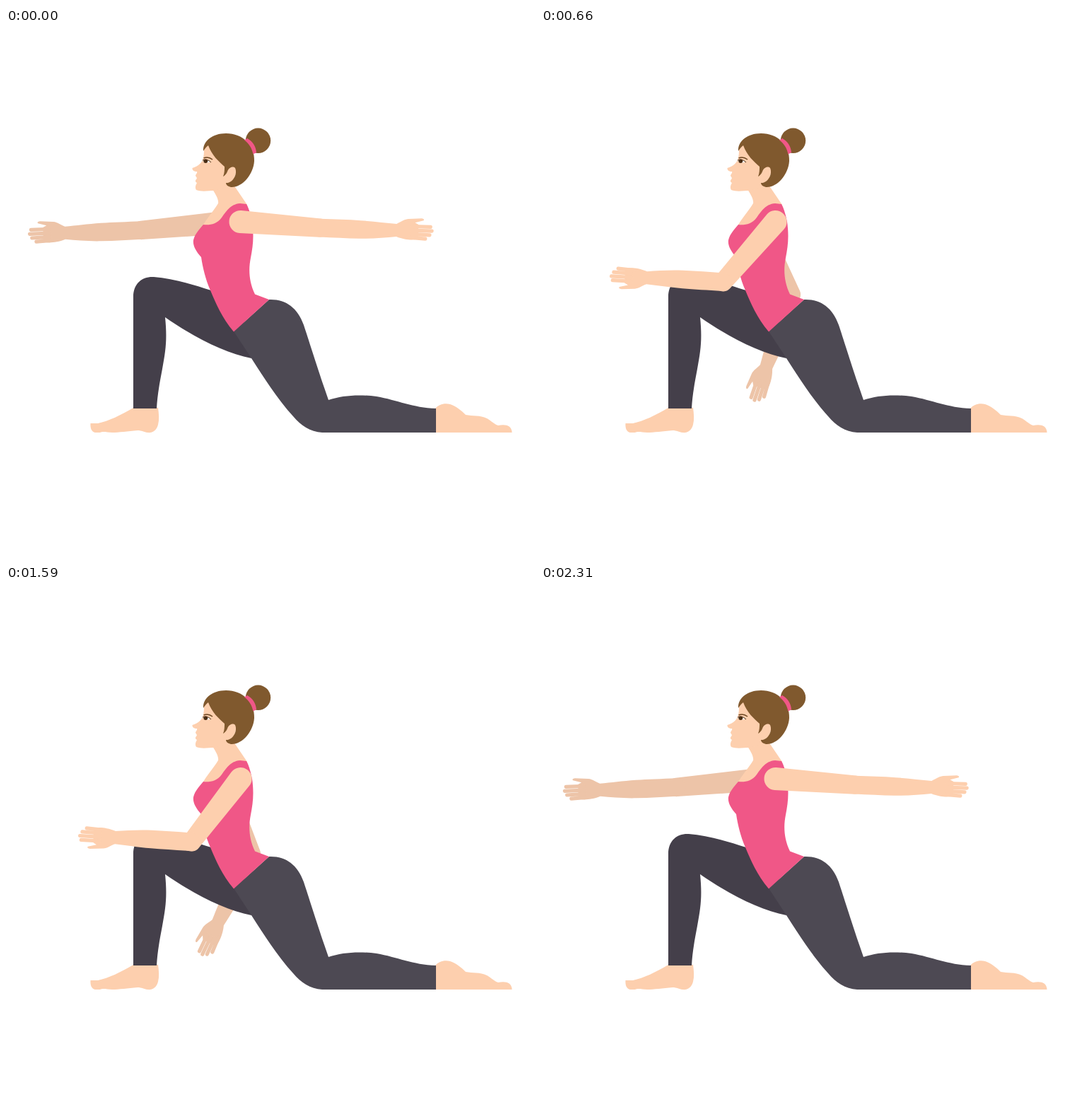
Write an HTML page that moves like this. It is 748x748 px and loops after 2430 ms.

```html
<!DOCTYPE html>
<html lang="en">
<head>
<meta charset="utf-8">
<title>Lunge with arm swing</title>
<style>
  html, body { margin: 0; width: 100%; height: 100%; overflow: hidden; background: #fff; }
  svg { display: block; width: 100%; height: 100%; }
  .skin { fill: #fdcfae; }
  .hair { fill: #80592e; }
  .top { fill: #f05787; }
  .near { fill: #fdcfae; stroke: #fdcfae; }
  .far { fill: #edc4a8; stroke: #edc4a8; }
  .limb { stroke: none; }
  .fingers { fill: none; stroke-width: 5.2; stroke-linecap: round; }
</style>
</head>
<body>
<svg viewBox="0 0 748 748">
  <defs>
    <path id="upper" class="limb" d="M0 -16 A16 16 0 0 0 0 16 L113 13.2 A13.2 13.2 0 0 0 113 -13.2Z"/>
    <g id="fore">
      <path class="limb" d="M0 -12.8 C20 -12.6 40 -12.6 57 -12 C76 -11.2 92 -9.6 108 -8.6
               C114 -11 118 -15 124 -15.8 L143 -17.2 Q148 -16.6 146 -14.2 L134 -11 L139 -8.2
               L139 9 L137 12.6 C131 14 120 14 108 9.5
               C92 11.4 76 13.4 57 13.6 C38 13.8 18 13.2 0 12.8 A12.8 12.8 0 0 1 0 -12.8Z"/>
      <path class="fingers" d="M130 -5.6 L156 -5.4 M130 0 L158 .4 M130 5.4 L155 6.2 M126 10.2 L149 11.6"/>
    </g>
  </defs>

  <g id="farArm" class="far">
    <use href="#upper"/>
    <g><use href="#fore" transform="scale(1 -1)"/></g>
  </g>

  <!-- front leg and foot -->
  <path class="skin" d="M180 537 H215 C216 545 217 553 215 561 C213 569 207 573 200 572 C195 571.5 192 569 186 569
    C172 570 160 572 150 572 C142 571.5 137 570 133 572 H126 C121 571 119 566 119.5 559 H130 C145 556 163 547 180 537Z"/>
  <path fill="#443f4a" d="M180 538 V380 C180 361 193 351 209 352 C235 354 262 362 290 371 L340 420 L347 467
    C310 460 265 437 225 409 C228 440 226 455 221 482 C217 503 214 520 213 538Z"/>

  <!-- back leg and foot -->
  <path class="skin" d="M607 538 C612 532 620 530 628 532 C637 535 644 541 650 547 C660 549 670 547 680 552
    C687 556 690 560 696 562 C705 560 715 561 715.5 572 H607Z"/>
  <path fill="#4d4953" d="M322 429 L372 384 C395 383 412 395 421 420 C428 441 442 486 456 526 C476 519 500 518 524 521
    C553 526 575 537 608 538 V572 H447 C430 571 417 562 406 549 C384 525 365 495 347 467Z"/>

  <!-- neck and vest -->
  <path class="skin" d="M292 228 C297 236 301 243 300 248 C294 258 285 268 279 278 L310 282 L341 250 L322 222Z"/>
  <path class="top" d="M279 278 C287 279 298 278 305 268 C312 258 318 249 331 248 L340 249 C343 254 346 264 348 274
    C351 295 349 310 346 325 C343 340 343 358 352 376.5 L372 384 L322 429.5 C305 409 297 390 289 371
    C282 355 278 338 276 324 C268 315 264 307 265 300 C267 291 274 284 279 278Z"/>

  <!-- head -->
  <circle class="hair" cx="356.5" cy="159.3" r="17.7"/>
  <path class="skin" d="M285 164 L280 172 C280 180 279 186 276 190 C272 195 267 197 263.5 198 C263 201 266 203 270 203
    C271 205 268 207 268 209 C269 211 271 212 269 214 C267 216 268 218 270 219 C268 222 267 226 269 229
    C276 232 287 230 295 230 L320 223 L328 195Z"/>
  <path class="hair" d="M279 174 C278 160 292 149 311 149 C335 149 352 166 351 188 C350 207 334 226 318 225
    C314 224 311 222 311 219 C320 220 328 207 324 198 C321 195 315 197 313 203 C312 206 309 209 307 210
    C309 205 309 200 309 196 C301 189 291 180 286 166 C283 168 281 171 279 174Z"/>
  <path class="top" d="M341 156 C349 160 353.5 168 354 176 L349.5 178.5 C348 170 343 163 337 158.5Z"/>
  <path d="M279.5 184 Q286 181.5 292 186" fill="none" stroke="#6b4520" stroke-width="1.5"/>
  <path d="M278 188 Q283 184 289 189 Q283 192.5 278 188Z" fill="#fff"/>
  <ellipse cx="282.3" cy="188.2" rx="2.9" ry="2.7" fill="#4a2d14"/>
  <path d="M278 187 Q284 184 290 190" fill="none" stroke="#4a2d14" stroke-width="1"/>

  <g id="nearArm" class="near">
    <use href="#upper"/>
    <g><use href="#fore"/></g>
  </g>
</svg>
<script>
  const LOOP = 2430, TICK = 30, UPPER = 113;

  // Angles in degrees, clockwise from the right: open, hanging, crossed.
  const arms = [
    { id: 'nearArm', x: 331.5, y: 274, upper: [4.4, 96, 182], fore: [1.5, 184.4, 180.8] },
    { id: 'farArm', x: 304, y: 275.5, upper: [174.7, 106, 2.3], fore: [178.2, 182, 3.3] }
  ];
  for (const arm of arms) {
    arm.el = document.getElementById(arm.id);
    arm.foreEl = arm.el.querySelector('g');
  }

  const ease = (t, from, to) => {
    const p = Math.min(1, Math.max(0, (t - from) / (to - from)));
    return p * p * (3 - 2 * p);
  };

  // 0 = open, 1 = hanging, 2 = crossed
  const phase = t =>
    ease(t, 0, 450) + ease(t, 450, 930) - ease(t, 1290, 1800) - ease(t, 1800, 2310);

  const mix = ([a, b, c], p) => p < 1 ? a + (b - a) * p : b + (c - b) * (p - 1);

  function draw(t) {
    const p = phase(t);
    for (const { el, foreEl, x, y, upper, fore } of arms) {
      const a = mix(upper, p), b = mix(fore, p);
      el.setAttribute('transform', `translate(${x} ${y}) rotate(${a})`);
      foreEl.setAttribute('transform', `translate(${UPPER} 0) rotate(${b - a})`);
    }
  }

  const start = performance.now();
  function loop() {
    const t = (performance.now() - start) % LOOP;
    draw(Math.floor(t / TICK) * TICK);
    requestAnimationFrame(loop);
  }
  loop();
</script>
</body>
</html>
```
